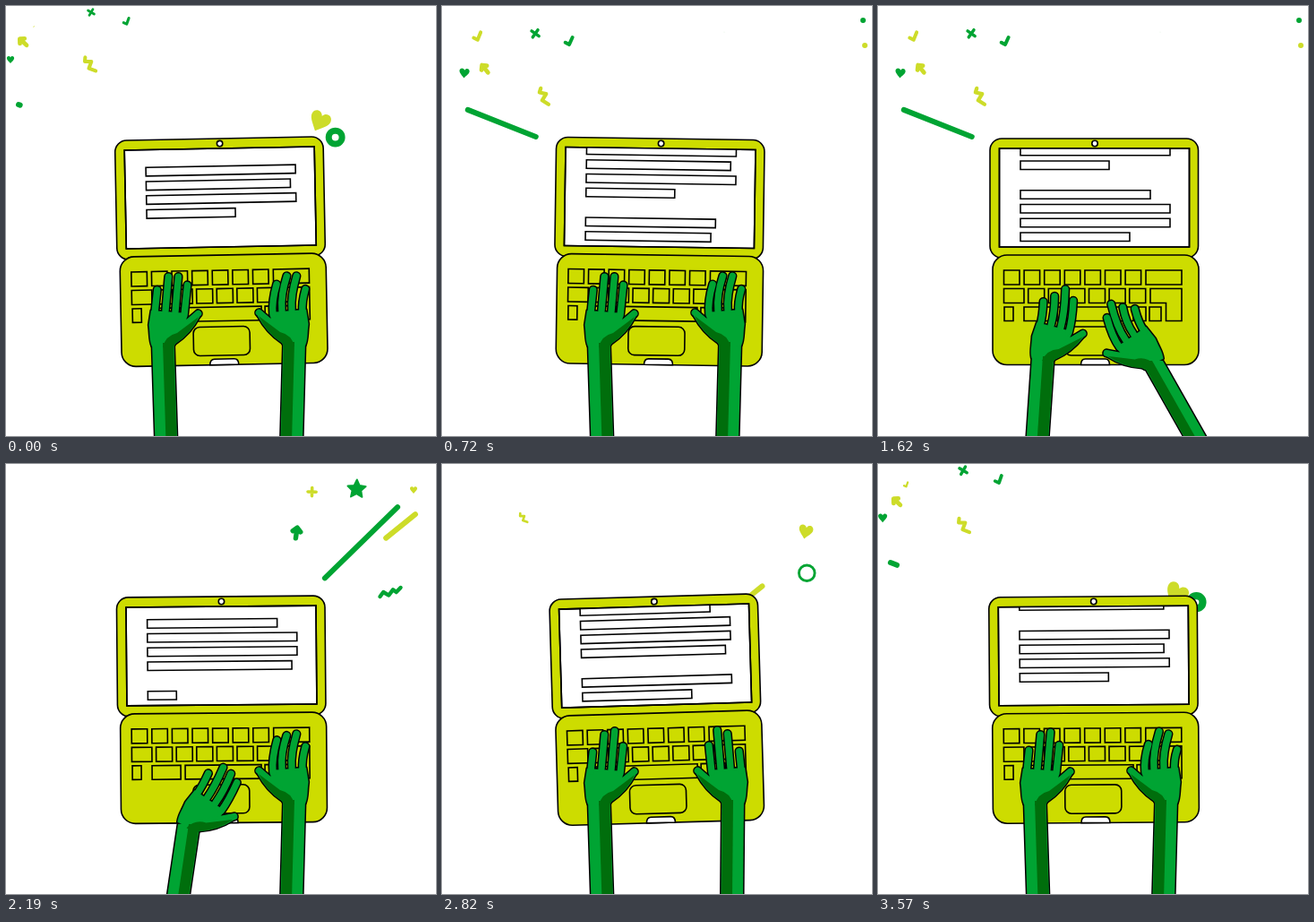
Write an HTML page that moves like this. It is 480 px wide and 480 px high and loops after 3.6 s.

```html
<!DOCTYPE html>
<html lang="en">
<head>
<meta charset="utf-8">
<title>Typing hands</title>
<style>
html,body{margin:0;width:100%;height:100%;overflow:hidden;background:#fff}
svg{display:block;width:100vw;height:100vh}
</style>
</head>
<body>
<svg viewBox="0 0 480 480">
  <defs><clipPath id="glass"><rect x="135.5" y="159" width="212" height="110"/></clipPath></defs>
  <g id="confetti" stroke-linecap="round" stroke-linejoin="round"></g>
  <g id="laptop" stroke="#000" stroke-width="1.6" fill="#cddc00">
    <rect x="125" y="148" width="232.5" height="133" rx="13"/>
    <rect x="135.5" y="159" width="212" height="110" fill="#fff"/>
    <circle cx="242" cy="153.5" r="3.2" fill="#fff"/>
    <g clip-path="url(#glass)"><g id="page" fill="#fff"></g></g>
    <rect x="135.5" y="159" width="212" height="110" fill="none"/>
    <rect x="128" y="278" width="230" height="122.5" rx="16"/>
    <g id="keys" fill="none"></g>
    <rect x="208.5" y="358" width="63" height="32" rx="7" fill="none"/>
    <path d="M226.5 400.5q0-6.500 5-6.500h22q5 0 5 6.500z" fill="#fff"/>
  </g>
  <g id="hands" stroke-linecap="round" stroke-linejoin="round"></g>
</svg>
<script>
const LOOP = 3600, BURST = 900;
const LIME = '#cddc29', GREEN = '#00a433', DARK = '#006e0c';
const $ = id => document.getElementById(id);
const clamp = k => Math.min(1, Math.max(0, k));
const smooth = k => k * k * (3 - 2 * k);
const easeOut = k => 1 - (1 - clamp(k)) ** 2;
const mix = (a, b, k) => a.map((v, i) => v + (b[i] - v) * k);

function set(node, attrs) {
  for (const k in attrs) node.setAttribute(k, attrs[k]);
}
function el(tag, parent, attrs) {
  const node = document.createElementNS('http://www.w3.org/2000/svg', tag);
  set(node, attrs);
  return parent.appendChild(node);
}

// Keyboard
const key = (x, y, width, height = 16) => el('rect', $('keys'), {x, y, width, height});
for (let i = 0; i < 7; i++) {
  key(140.5 + i * 22.6, 295, 17.5);
  key(i ? 145.100 + i * 22.6 : 140.5, 315.5, i ? 18 : 22.5);
}
key(299, 295, 40);
el('path', $('keys'), {d: 'M304 315.5h35v36h-17.5v-20h-17.5z'});
[[141, 10], [163, 32], [200, 85], [289, 10], [303, 13]].forEach(([x, w]) => key(x, 336, w, 15.5));

// Two paragraphs of four lines: width and typing start
const SPEED = .45, SCROLL_MS = 4.2, PAGE = 160;
let depth = 0;
const lines = [
  [145, 25], [167, 410], [167, 857], [161, 1350],
  [167, 2120], [161, 2550], [167, 2925], [99, 3310]
].map(([w, start], i) => {
  const gap = i % 4 ? 15.75 : 32.75;
  return {w, start, gap, y: depth += gap};
});
const bars = [-1, 0].flatMap(turn => lines.map(line => ({
  w: line.w, y: line.y + turn * PAGE, start: line.start + turn * LOOP,
  node: el('rect', $('page'), {x: 159, height: 9.5})
})));

// The page moves up just before each line is typed
function scrolled(t) {
  let sum = 0;
  for (const turn of [0, LOOP])
    for (const {gap, start} of lines) sum += gap * clamp(1 + (t - start - turn) / (gap * SCROLL_MS));
  return sum;
}

const tilts = [[0, -1.1], [360, 1.1], [1140, .5], [1620, 0], [2190, -.5], [2820, -1.65], [3570, -.4], [3600, -1.1]];
function tiltAt(t) {
  const i = tilts.findIndex(([end]) => end > t);
  const [t0, a] = tilts[i - 1], [t1, b] = tilts[i];
  return a + (b - a) * smooth((t - t0) / (t1 - t0));
}

function drawLaptop(t) {
  set($('laptop'), {transform: `rotate(${tiltAt(t)} 242 332)`});
  const shift = scrolled(t);
  for (const {node, w, y, start} of bars) {
    const width = Math.min(w, Math.max(0, (t - start) * SPEED));
    set(node, {y: 253 + y - shift, width, visibility: width ? 'visible' : 'hidden'});
  }
}

// Fingers from little finger to thumb: knuckle x, y, length, angle
const fingers = [[-9, -33, 27, 6], [3, -36, 38, 5], [14, -35, 43, 5], [24, -31, 36, 6], [17, -13, 30, 49]];
const PALM = 'M-12 4C-15-3-14-8-15.500-20L-13-36L27-33L26-22L36-29L41-29Q31-10 14 1L12 4Z';
const SHADE = 'M0 5Q3-8 16-11L36-26L40-29Q31-10 14 1L12 5Z';

// home and moves: wrist x, y, turn, arm end x, finger lean
function makeHand(side, home, moves) {
  const layer = (color, extra) => {
    const root = el('g', $('hands'), {fill: color, stroke: color});
    const arm = el('path', root, {'stroke-width': extra});
    const hand = el('g', root, {});
    el('path', hand, {d: PALM, 'stroke-width': extra + .3});
    const tips = fingers.map(() => el('path', hand, {fill: 'none', 'stroke-width': 7.4 + extra}));
    return {root, arm, hand, tips};
  };
  const layers = [layer('#000', 3), layer(GREEN, 0)];
  const sleeve = el('path', layers[1].root, {fill: DARK, stroke: 'none'});
  el('path', layers[1].hand, {d: SHADE, fill: DARK, stroke: 'none'});

  return t => {
    const pose = [...home];
    for (const [time, ...delta] of moves) {
      const k = smooth(clamp(1 - Math.abs(t - time) / 340));
      delta.forEach((v, i) => pose[i] += v * k);
    }
    const [x, y, turn, armX, lean] = pose;
    const end = (armX - x) * side, floor = 486 - y;
    const strip = (a, b) => `M${a} 0L${end + a} ${floor}H${end + b}L${b} 0Z`;
    const paths = fingers.map(([kx, ky, len, angle], i) => {
      const thumb = i === 4;
      const tap = thumb ? 0 : 6 * Math.max(0, Math.sin(t * Math.PI / 180 + i * 2 + 3));
      const reach = (deg, r) => {
        const a = deg * Math.PI / 180;
        return `${kx + r * Math.sin(a)} ${ky - r * Math.cos(a)}`;
      };
      return `M${kx} ${ky}Q${reach(angle, len * .4)} ${reach(angle + (thumb ? 0 : lean), len - tap)}`;
    });
    for (const {root, arm, hand, tips} of layers) {
      set(root, {transform: `translate(${x} ${y}) scale(${side} 1)`});
      set(arm, {d: strip(-12, 12.5)});
      set(hand, {transform: `rotate(${turn})`});
      tips.forEach((tip, i) => set(tip, {d: paths[i]}));
    }
    set(sleeve, {d: strip(0, 12)});
  };
}
const hands = [
  makeHand(1, [175, 376, 0, 178.5, 0], [
    [360, -23, -10, 6, -47, -7], [1140, 1, 0, 0, 0, -13], [1620, 9, 15, 10, -1, -8], [2190, 29, 26, 30, 13, -7]
  ]),
  makeHand(-1, [322, 375, 0, 319, -13], [
    [360, -20, 23, 0, -21, 0], [1140, 0, 0, 0, 0, 13], [1620, -16, 21, 30, 38, 0], [2820, 3, 0, 0, 5, 13]
  ])
];

// Confetti shapes: path and stroke width
const starPoint = (_, i) => {
  const r = i % 2 ? 5.6 : 11.5, a = i * Math.PI / 5;
  return `${r * Math.sin(a)} ${-r * Math.cos(a)}`;
};
const shapes = {
  heart: ['M0 12C-5 6-12 1-12-5C-12-12-3-14 0-7C3-14 12-12 12-5C12 1 5 6 0 12Z', 0],
  star: [`M${Array.from({length: 10}, starPoint).join('L')}Z`, 2],
  plus: ['M0-8.500V8.500M-8.500 0H8.500', 6.5],
  cross: ['M-4-4L4 4M4-4L-4 4', 4],
  check: ['M-3.500 2L1 4L4-4.500', 4],
  arrow: ['M0 6V-4M-4-1L0-5L4-1', 5],
  wave: ['M-11 3L-7-1L-2 3L3-2L6 1L11-3', 4],
  zigzag: ['M-5-9L-6-4L2-3L-2 5L6 9', 4.5]
};
const FLY = 410, FADE = 70;
const bits = [];
const addBit = (node, start, life, paint) => bits.push({node, start, life, paint});

// A piece slows down on its way, changes size, then shrinks to nothing
function piece(shape, color, start, from, to, size, angle) {
  const [d, w] = shapes[shape];
  const node = el('path', $('confetti'), {
    d, fill: w > 2 ? 'none' : color, stroke: w ? color : 'none', 'stroke-width': w
  });
  addBit(node, start, FLY + FADE, age => {
    const k = easeOut(age / FLY);
    const [x, y] = mix(from, to, k);
    const s = (size[0] + (size[1] - size[0]) * k) * clamp((FLY + FADE - age) / FADE);
    set(node, {transform: `translate(${x} ${y}) rotate(${angle + 30 * (1 - k)}) scale(${s})`});
  });
}
// The tail follows the head until only a dot is left
function streak(color, start, fly, lag, from, to) {
  const node = el('line', $('confetti'), {stroke: color, 'stroke-width': 6});
  addBit(node, start, fly + lag + 60, age => {
    const [x1, y1] = mix(from, to, easeOut((age - lag) / fly));
    const [x2, y2] = mix(from, to, easeOut(age / fly));
    set(node, {x1, y1, x2, y2});
  });
}
function ring(color, start, from, to) {
  const node = el('circle', $('confetti'), {stroke: color, fill: 'none'});
  addBit(node, start, FLY, age => {
    const k = easeOut(age / FLY);
    const [cx, cy] = mix(from, to, k);
    set(node, {cx, cy, r: 7 + 3 * k, 'stroke-width': Math.max(0, 8.3 - 9 * k)});
  });
}

// Right burst
piece('heart', LIME, -30, [332, 146], [455, 29], [1.05, .4], 0);
ring(GREEN, -30, [355, 154.5], [442, 100]);
piece('star', GREEN, 125, [338, 121], [399, 15], [1.1, .9], -2);
piece('plus', LIME, 125, [296, 216], [348, 5], [1.55, .4], -2);
piece('arrow', GREEN, 242, [338, 146], [315, 29], [1.2, 1], -4);
piece('wave', GREEN, 125, [358, 157], [439, 141], [1.1, 1.1], -12);
streak(GREEN, 242, 300, 130, [340, 143], [470, 16]);
streak(LIME, 95, 450, 120, [343, 148], [472, 44]);

// Left burst
piece('check', LIME, 430, [125, 150], [31, 23], [1, 1], 0);
piece('cross', GREEN, 478, [150, 150], [95, 7], [1, .85], -15);
piece('check', GREEN, 478, [178, 150], [134, 17], [1.2, .95], 0);
piece('arrow', LIME, 527, [125, 150], [18, 39], [1, .95], -47);
piece('heart', GREEN, 478, [125, 150], [5, 60], [.7, .42], 0);
piece('zigzag', LIME, 587, [142, 150], [91, 60], [1, .9], -8);
streak(GREEN, 575, 230, 124, [125, 154], [14, 110]);

function drawConfetti(t) {
  for (const {node, start, life, paint} of bits) {
    const age = (t - start + BURST) % BURST;
    set(node, {visibility: age < life ? 'visible' : 'hidden'});
    if (age < life) paint(age);
  }
}

function draw(t) {
  drawConfetti(t);
  drawLaptop(t);
  hands.forEach(hand => hand(t));
}

draw(0);
const begin = performance.now();
requestAnimationFrame(function tick(now) {
  draw(Math.max(0, now - begin) % LOOP);
  requestAnimationFrame(tick);
});
</script>
</body>
</html>
```
